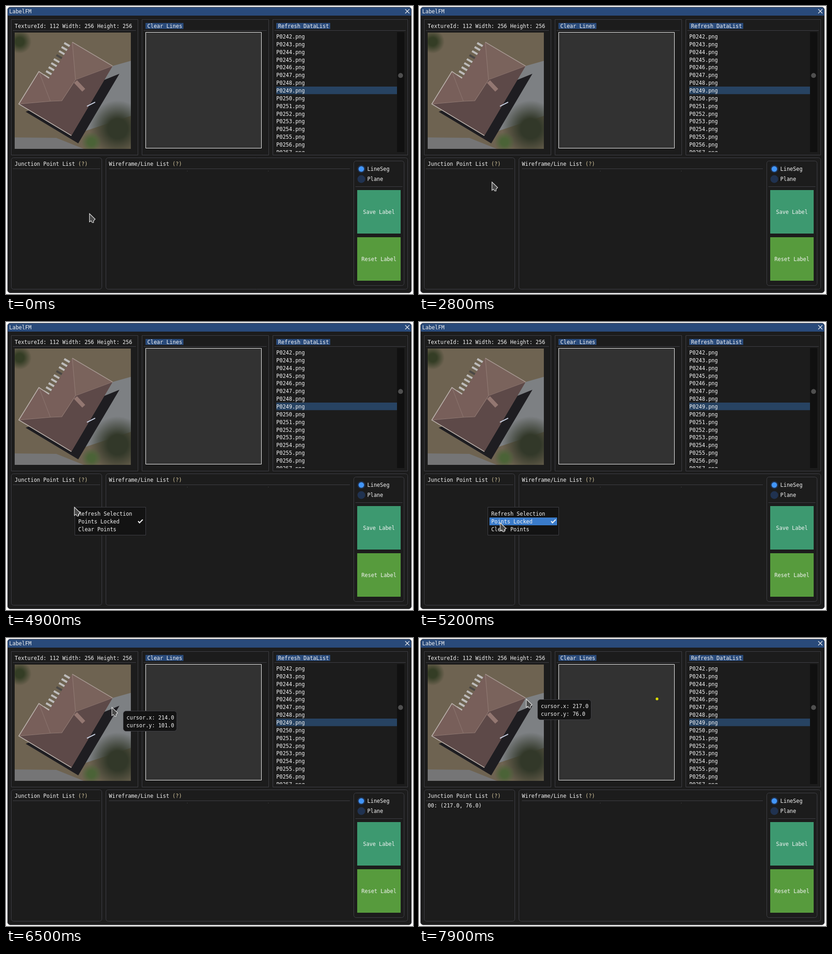
An HTML page with a canvas that plays this animation: 890x629 px, repeating every 8 s.

```html
<!DOCTYPE html>
<html lang="en">
<head>
<meta charset="utf-8">
<title>LabelFM</title>
<style>
  html, body { margin: 0; width: 100%; height: 100%; overflow: hidden; background: #fff; }
  canvas { display: block; }
</style>
</head>
<body>
<canvas id="stage" width="890" height="629"></canvas>
<script>
const ctx = document.getElementById('stage').getContext('2d');
const LOOP = 8000, STEP = 100;
const BORDER = '#414147', BLUE = '#294a7a', WHITE = '#f4f4f4', POPUP = '#131313';
const PHOTO = { x: 19, y: 58, size: 254 };

// The pointer eases to each stop, then rests until the next move begins.
const START = { x: 182, y: 453 };
const MOVES = [
  { at: 300, steps: 9, x: 170, y: 344.5 },
  { at: 2800, steps: 1, x: 159, y: 384 },
  { at: 3400, steps: 3, x: 175, y: 400 },
  { at: 4300, steps: 3, x: 149, y: 404 },
  { at: 5000, steps: 3, x: 177, y: 438 },
  { at: 6000, steps: 2, x: 210, y: 259 },
  { at: 6200, steps: 1, x: 234, y: 202 },
  { at: 6300, steps: 2, x: 232, y: 169 },
  { at: 6500, steps: 1, x: 231, y: 151 },
  { at: 6600, steps: 3, x: 230, y: 134 },
  { at: 6900, steps: 2, x: 227.5, y: 130.5 },
  { at: 7300, steps: 3, x: 234, y: 133 }
];
const MENUS = [
  { from: 3200, to: 4100, x: 161, y: 385 },
  { from: 4600, to: 5800, x: 150, y: 404 }
];

const lerp = (a, b, p) => a + (b - a) * p;
const mix = (a, b, p) => ({ x: lerp(a.x, b.x, p), y: lerp(a.y, b.y, p) });
const smooth = p => p * p * (3 - 2 * p);

function cursorAt(time) {
  return MOVES.filter(move => time >= move.at).reduce((from, move) => {
    const p = Math.min(1, ((time - move.at) / STEP + 1) / move.steps);
    return mix(from, move, smooth(p));
  }, START);
}

function rect(x, y, w, h, color) {
  ctx.fillStyle = color;
  ctx.fillRect(x, y, w, h);
}

function box(x, y, w, h, radius, fill, stroke = BORDER) {
  ctx.beginPath();
  ctx.roundRect(x + 0.5, y + 0.5, w, h, radius);
  if (fill) { ctx.fillStyle = fill; ctx.fill(); }
  ctx.strokeStyle = stroke;
  ctx.lineWidth = 1;
  ctx.stroke();
}

const rule = (x, y, w) => rect(x, y, w, 1, BORDER);

function text(str, x, y, color = WHITE) {
  ctx.fillStyle = color;
  ctx.fillText(str, x, y);
}

function textLines(lines, x, y, spacing) {
  lines.forEach((str, i) => text(str, x, y + i * spacing));
}

function circle(x, y, r, color) {
  ctx.fillStyle = color;
  ctx.beginPath();
  ctx.arc(x, y, r, 0, 2 * Math.PI);
  ctx.fill();
}

function trace(points) {
  ctx.beginPath();
  for (const { x, y } of points) ctx.lineTo(x, y);
}

function poly(color, ...points) {
  trace(points);
  ctx.fillStyle = color;
  ctx.fill();
}

function line(color, width, ...points) {
  trace(points);
  ctx.strokeStyle = color;
  ctx.lineWidth = width;
  ctx.stroke();
}

const point = (x, y) => ({ x, y });

function glow(x, y, r, color) {
  const g = ctx.createRadialGradient(x, y, r * 0.35, x, y, r);
  g.addColorStop(0, color);
  g.addColorStop(1, color + '00');
  circle(x, y, r, g);
}

function clipped(x, y, w, h, draw) {
  ctx.save();
  ctx.beginPath();
  ctx.rect(x, y, w, h);
  ctx.clip();
  draw();
  ctx.restore();
}

function photo() {
  const west = point(28, 214), wing = point(72, 143), notch = point(94, 158);
  const north = point(145, 79), east = point(233, 131), south = point(143, 283);
  const ridge = point(152, 161), valley = point(122, 207), hip = point(97, 208);
  const outline = [north, east, south, west, wing, notch];

  rect(PHOTO.x, PHOTO.y, PHOTO.size, PHOTO.size, '#6e6351');
  glow(30, 78, 26, '#343d25');
  poly('#7d8083', east, point(290, 115), point(273, 240), south);
  poly('#757576', point(19, 287), point(110, 288), point(170, 312), point(19, 312));

  // The house throws its own outline as a shadow.
  ctx.save();
  ctx.translate(15, 17);
  poly('#1e1d21', east, south, west);
  ctx.restore();
  glow(244, 268, 62, '#323829');
  glow(187, 297, 22, '#4b6337');

  // Stairs run along the wall between the wing and the north corner.
  for (let i = 0; i < 9; i++) {
    const p = mix(notch, north, i / 9);
    line(i === 5 ? '#4a4745' : '#bdbbba', 4.5, point(p.x - 12, p.y - 7), p);
  }

  poly('#785f5a', ...outline);
  poly('#7a635c', north, east, ridge);
  poly('#5d4948', west, hip, valley, ridge, east, south);
  line('#917b74', 1.2, north, ridge, valley, hip, west);
  line('#8a736d', 1.2, wing, hip);
  line('#8a736d', 1, ridge, east);
  line('#b8afa9', 1.8, notch, wing, west, south);
  line('#a69891', 1.5, north, east);
  line('#937771', 9, point(152, 165), point(170, 184));
  line('#c8d0e2', 2, point(177, 219), point(195, 210));
}

function windowFrame() {
  rect(0, 0, 890, 629, '#fff');
  ctx.save();
  ctx.beginPath();
  ctx.roundRect(3, 2, 884, 625, 7);
  ctx.clip();
  rect(3, 2, 884, 625, '#1c1c1c');
  rect(3, 2, 884, 19, BLUE);
  ctx.restore();
  box(3, 2, 883, 624, 7);
  text('LabelFM', 7, 16);
  for (const slope of [-1, 1]) {
    line(WHITE, 1.2, point(873, 11.5 - slope * 4.5), point(882, 11.5 + slope * 4.5));
  }
}

function panel(x, w) {
  box(x, 29, w, 296, 0);
  rule(x + 4, 53, w - 8);
}

function topPanels() {
  panel(11, 277);
  text('TextureId: 112 Width: 256 Height: 256', 19, 48);
  clipped(PHOTO.x, PHOTO.y, PHOTO.size, PHOTO.size, photo);

  panel(297, 277);
  rect(305, 37, 83, 13, BLUE);
  text('Clear Lines', 309, 48);
  box(305, 57, 253, 253, 0, '#323232', '#fff');

  panel(583, 295);
  rect(591, 37, 118, 13, BLUE);
  text('Refresh DataList', 595, 48);
  clipped(587, 57, 290, 262, () => {
    rect(591, 176, 264, 16.5, '#274362');
    const files = Array.from({ length: 16 }, (_, i) => `P0${242 + i}.png`);
    textLines(files, 591, 71, 16.86);
    rect(855, 57, 16, 262, '#101010');
  });
  circle(862.8, 151.7, 5.4, '#4f4f4f');
}

function listHeader(title, x, y) {
  text(title, x, y);
  text('(?)', x + ctx.measureText(title + ' ').width, y, '#d3c59c');
}

function radio(label, y, selected) {
  circle(777, y, 8.5, '#203250');
  if (selected) circle(777, y, 6, '#4296fa');
  text(label, 790, y + 4);
}

function button(label, y, color) {
  rect(768, y, 95, 95, color);
  text(label, 815.5 - ctx.measureText(label).width / 2, y + 51.5);
}

function bottomPanels() {
  box(11, 331, 198, 287, 5);
  listHeader('Junction Point List', 19, 349);
  rule(15, 355, 191);

  box(218, 331, 660, 287, 5);
  listHeader('Wireframe/Line List', 225, 349);
  rule(225, 355, 527);
  for (const x of [396, 573]) rect(x, 360, 1, 1, '#55555a');

  box(760, 338, 110, 272, 5);
  radio('LineSeg', 356, true);
  radio('Plane', 378, false);
  rule(764, 394, 103);
  button('Save Label', 402, '#3d9970');
  button('Reset Label', 505, '#579b3d');
}

function menu({ x, y }, mouse) {
  box(x, y, 155, 61, 0, POPUP);
  const row = Math.floor((mouse.y - y - 5.5) / 17);
  if (mouse.x > x + 4 && row >= 0 && row < 3) rect(x + 4, y + 6 + row * 17, 148, 17, '#3a7bca');
  textLines(['Refresh Selection', 'Points Locked', 'Clear Points'], x + 8, y + 18.5, 17);
  line(WHITE, 2.4, point(x + 139, y + 31), point(x + 142, y + 34.5), point(x + 149, y + 27.5));
}

function helpTip(x, y) {
  box(x, y, 285, 53, 6, POPUP);
  textLines(['Click image to change point annotation.', '(L-Click) add a point', '(R-Click) Revoke'],
    x + 8, y + 18, 13);
}

function coordinateTip(mouse) {
  const x = Math.round(mouse.x + 24.5), y = Math.round(mouse.y + 0.5);
  const readout = axis => {
    const pixel = Math.round((mouse[axis] - PHOTO[axis]) * 256 / PHOTO.size);
    return `cursor.${axis}: ${pixel.toFixed(1)}`;
  };
  box(x, y, 117, 44, 6, POPUP);
  textLines([readout('x'), readout('y')], x + 7.5, y + 18.5, 17);
}

const arrow = new Path2D('M0 0V18L3.5 15.5L6 19.5H9V15.5L12.5 12Z');

function pointer({ x, y }) {
  ctx.save();
  ctx.translate(x + 0.5, y + 0.5);
  ctx.fillStyle = '#4a4a4a';
  ctx.fill(arrow);
  ctx.strokeStyle = '#e4e4e4';
  ctx.lineWidth = 1.2;
  ctx.stroke(arrow);
  ctx.restore();
}

function draw(time) {
  ctx.font = '11.54px "DejaVu Sans Mono", monospace';
  windowFrame();
  topPanels();
  bottomPanels();

  const cursor = cursorAt(time);
  if (time >= 7900) {
    circle(520.5, 133, 3, '#dcdc00');
    text('00: (217.0, 76.0)', 19, 370);
  }
  if (time >= 1000 && time < 2800) helpTip(Math.round(cursor.x + 25), Math.round(cursor.y + 1));
  for (const item of MENUS) {
    if (time >= item.from && time < item.to) menu(item, cursor);
  }

  // The readout trails the pointer while it moves quickly.
  const lag = time < 6900 ? 0.4 : 0;
  const mouse = mix(cursor, cursorAt(time - STEP), lag);
  if (mouse.y < PHOTO.y + PHOTO.size) coordinateTip(mouse);
  pointer(cursor);
}

const began = performance.now();
function tick() {
  const time = (performance.now() - began) % LOOP;
  draw(Math.floor(time / STEP) * STEP);
  requestAnimationFrame(tick);
}
tick();
</script>
</body>
</html>
```
